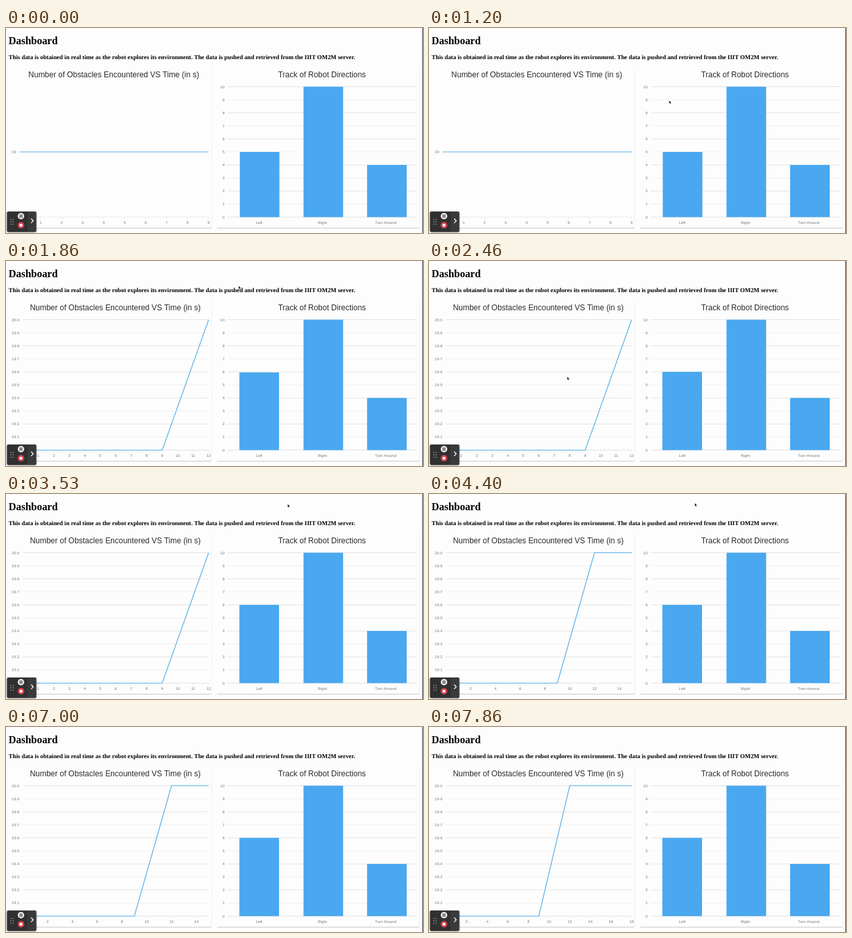
Animation, 640 px wide and 316 px high, one loop 8000 ms. Source, as an HTML page:

```html
<!DOCTYPE html>
<html lang="en">
<head>
<meta charset="utf-8">
<title>Dashboard</title>
<style>
html, body { margin: 0; width: 100%; height: 100%; overflow: hidden; background: #fdfdfd; }
svg { display: block; width: 640px; height: 316px; }
text { font: 6px "Liberation Sans", Arial, sans-serif; fill: #777; }
.serif { font-family: "Liberation Serif", "Times New Roman", serif; font-weight: bold; fill: #000; }
.title { font-size: 11.98px; fill: #2b2b2b; }
.mid { text-anchor: middle; }
.end { text-anchor: end; }
.card { fill: #fdfdfd; filter: drop-shadow(0 1px .6px rgba(0, 0, 0, .2)); }
.bar { fill: #49a8ef; }
#recorder { filter: drop-shadow(0 0 1px rgba(0, 0, 0, .5)); }
</style>
</head>
<body>
<svg viewBox="0 0 640 316">
  <text class="serif" x="4" y="25" style="font-size:15.95px">Dashboard</text>
  <text class="serif" x="4" y="48" style="font-size:9.34px" text-rendering="geometricPrecision">This data is obtained in real time as the robot explores its environment. The data is pushed and retrieved from the IIIT OM2M server.</text>
  <rect class="card" x="4" y="60" width="311.5" height="248" rx="1"/>
  <rect class="card" x="324" y="60" width="310.5" height="248" rx="1"/>
  <rect x="639" width="1" height="316" fill="#444"/>
  <g id="lineChart"></g>
  <g id="barGrid"></g>
  <rect id="leftBar" class="bar" width="60.8"/>
  <rect class="bar" x="456.6" y="90.5" width="60.8" height="201"/>
  <rect class="bar" x="554.2" y="211.1" width="60.8" height="80.4"/>
  <g id="recorder">
    <rect x="1.5" y="283" width="45" height="31.5" rx="2" fill="#303030"/>
    <path d="M33 283.5h11q2 0 2 2v26.5q0 2-2 2H33z" fill="#3a3a3a"/>
    <path d="M7.5 295.2v7.6M11 295.2v7.6" stroke="#ccc" stroke-width="1.4" stroke-linecap="round" stroke-dasharray="0 3.6"/>
    <circle cx="23" cy="290" r="5" fill="#e8e8e8"/>
    <path d="M21.7 287.6v4.8M24.3 287.6v4.8" stroke="#333" stroke-width="1.3"/>
    <circle cx="23" cy="304" r="5" fill="#d8434f"/>
    <rect x="21" y="302" width="4" height="4" fill="#fff"/>
    <path d="M38.6 293.8l3.2 3.4-3.2 3.4" fill="none" stroke="#fff" stroke-width="1.3"/>
  </g>
  <path id="cursor" d="M0 0v4.9l1.1-1 .8 1.7 .9-.4-.8-1.6h1.5z" fill="#000" stroke="#fff" stroke-width=".3"/>
</svg>
<script>
const LOOP = 8000, BASE = 291.5, TOP = 90.5, RIGHT = 311;
const UPDATES = [1330, 4365, 7400];
const BAR_START = 1313, BAR_TIME = 1000;
// Pointer way points: time, x, y
const PATH = [[920, 452, 190], [1200, 368.5, 112], [1460, 378.5, 32.5], [1800, 372, 24],
  [2460, 212, 178.5], [2660, 236, 160], [3100, 440, 60], [3350, 520, 10],
  [3530, 432.5, 15.5], [3660, 408, 14], [5660, 408, 14]];

const $ = id => document.getElementById(id);
const label = (x, y, s, cls) => `<text class="${cls}" x="${x}" y="${y}">${s}</text>`;
const rule = (x1, x2, y, color) =>
  `<path d="M${x1} ${y}H${x2}" stroke="${color}" stroke-width=".8"/>`;

// Eleven levels with alternating grid lines, labelled by name(i)
function levels(x1, x2, labelX, name) {
  let out = "";
  for (let i = 0; i <= 10; i++) {
    const y = BASE - i * 20.1;
    out += rule(x1, x2, y, i % 2 ? "#ededed" : "#dcdcdc") +
      label(labelX, y + 2, name(i), "end");
  }
  return out;
}

function lineChart(state) {
  const max = 9 + 3 * state, x0 = state ? 26 : 21;
  const px = v => x0 + v * (RIGHT - x0) / max;
  let out = label(state ? 167.7 : 165.4, 76, "Number of Obstacles Encountered VS Time (in s)", "title mid");
  out += state
    ? levels(x0, RIGHT, 20.5, i => (19 + i / 10).toFixed(1))
    : rule(x0, RIGHT, BASE, "#e6e6e6") + label(15.5, 193, "19", "end");
  for (let v = 0; v <= max; v += state > 1 ? 2 : 1)
    out += label(px(v), 302.3, v, "mid") +
      `<path d="M${px(v)} ${BASE}v3" stroke="#ddd" stroke-width=".6"/>`;
  const d = state
    ? `M${x0} ${BASE}H${px(9)}L${px(12)} ${TOP}H${RIGHT}`
    : `M${x0} 191H${RIGHT}`;
  return out + `<path d="${d}" fill="none" stroke="#55aee9" stroke-width="1.2"/>`;
}

$("barGrid").innerHTML = label(485, 76, "Track of Robot Directions", "title mid") +
  levels(340, 631, 335.5, i => i) +
  ["Left", "Right", "Turn Around"].map((s, i) => label(388.6 + i * 97, 302.3, s, "mid")).join("");

function pointer(t) {
  const i = PATH.findIndex(p => p[0] > t);
  $("cursor").style.display = i > 0 ? "" : "none";
  if (i < 1) return;
  const [a, b] = [PATH[i - 1], PATH[i]];
  const k = (t - a[0]) / (b[0] - a[0]);
  const at = n => a[n] + (b[n] - a[n]) * k;
  $("cursor").setAttribute("transform", `translate(${at(1)} ${at(2)})`);
}

let shown = -1;
function draw(t) {
  const state = UPDATES.filter(u => t >= u).length;
  if (state !== shown) {
    $("lineChart").innerHTML = lineChart(state);
    shown = state;
  }
  const k = Math.min(1, Math.max(0, (t - BAR_START) / BAR_TIME));
  const height = 20.1 * (6 - (1 - k) ** 4);
  const bar = $("leftBar");
  bar.setAttribute("x", state ? 358.2 : 358.8);
  bar.setAttribute("y", BASE - height);
  bar.setAttribute("height", height);
  pointer(t);
}

const start = performance.now();
function tick() {
  draw((performance.now() - start) % LOOP);
  requestAnimationFrame(tick);
}
tick();
</script>
</body>
</html>
```
